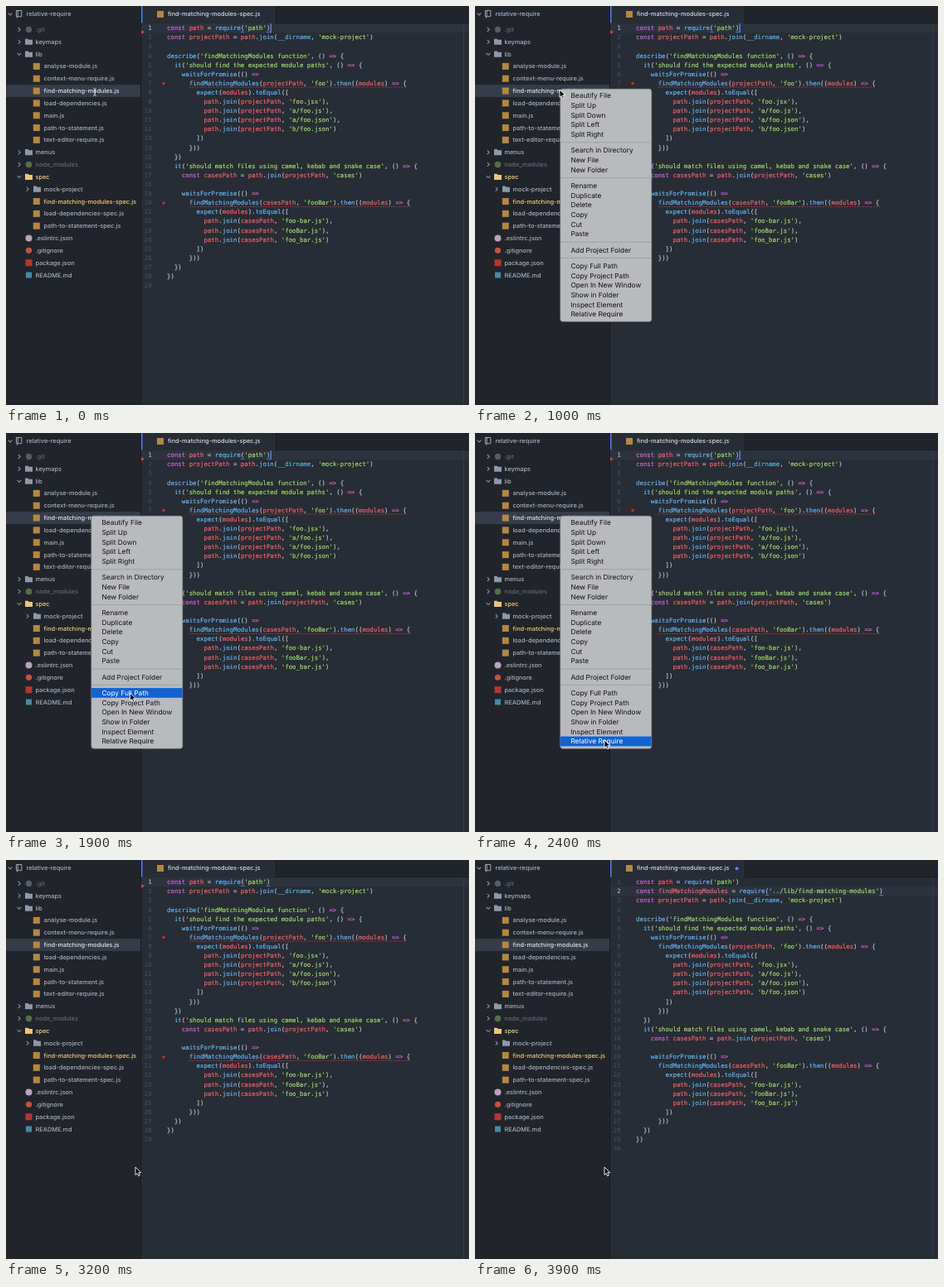
Recreate the animation shown at these times as an HTML page. Size 558 by 482 pixels, loop 4000 ms.

```html
<!DOCTYPE html>
<html lang="en">
<head>
<meta charset="utf-8">
<title>Relative require</title>
<style>
html, body { margin: 0; width: 100%; height: 100%; overflow: hidden; background: #21252b; }
svg { display: block; width: 558px; height: 482px; text-rendering: geometricPrecision; }
text { white-space: pre; fill: currentColor; }
.ui { font: 500 7.35px Inter, "Liberation Sans", sans-serif; }
.menu { font: 8.3px Inter, "Liberation Sans", sans-serif; }
.code { font: 7.39px "DejaVu Sans Mono", monospace; stroke: currentColor; stroke-width: .16; }
</style>
</head>
<body>
<svg id="stage" viewBox="0 0 558 482"></svg>
<script>
const CW = 4.449, LH = 11.107, TOP = 21.2, LEFT = 194;
const SOURCE = `const path = require('path')
const projectPath = path.join(__dirname, 'mock-project')

describe('findMatchingModules function', () => {
  it('should find the expected module paths', () => {
    waitsForPromise(() =>
      findMatchingModules(projectPath, 'foo').then((modules) => {
        expect(modules).toEqual([
          path.join(projectPath, 'foo.jsx'),
          path.join(projectPath, 'a/foo.js'),
          path.join(projectPath, 'a/foo.json'),
          path.join(projectPath, 'b/foo.json')
        ])
      }))
  })
  it('should match files using camel, kebab and snake case', () => {
    const casesPath = path.join(projectPath, 'cases')

    waitsForPromise(() =>
      findMatchingModules(casesPath, 'fooBar').then((modules) => {
        expect(modules).toEqual([
          path.join(casesPath, 'foo-bar.js'),
          path.join(casesPath, 'fooBar.js'),
          path.join(casesPath, 'foo_bar.js')
        ])
      }))
  })
})
`.split('\n');
const INSERTED = "const findMatchingModules = require('../lib/find-matching-modules')";

// depth, kind, label, state
const TREE = [
  [0, 'closed git', '.git', 'dim'], [0, 'closed folder', 'keymaps'], [0, 'open folder', 'lib'],
  [1, 'js', 'analyse-module.js'], [1, 'js', 'context-menu-require.js'],
  [1, 'js', 'find-matching-modules.js', 'selected'], [1, 'js', 'load-dependencies.js'],
  [1, 'js', 'main.js'], [1, 'js', 'path-to-statement.js'], [1, 'js', 'text-editor-require.js'],
  [0, 'closed folder', 'menus'], [0, 'closed node', 'node_modules', 'dim'],
  [0, 'open folder', 'spec', 'changed'], [1, 'closed folder', 'mock-project'],
  [1, 'js', 'find-matching-modules-spec.js', 'changed'], [1, 'js', 'load-dependencies-spec.js'],
  [1, 'js', 'path-to-statement-spec.js'], [0, 'lint', '.eslintrc.json'],
  [0, 'git', '.gitignore'], [0, 'pkg', 'package.json'], [0, 'doc', 'README.md']
];
const TINT = { dim: '#626a78', selected: '#e4e8ee', changed: '#f3cd80' };

const MENU = ['Beautify File', 'Split Up', 'Split Down', 'Split Left', 'Split Right', '',
  'Search in Directory', 'New File', 'New Folder', '',
  'Rename', 'Duplicate', 'Delete', 'Copy', 'Cut', 'Paste', '', 'Add Project Folder', '',
  'Copy Full Path', 'Copy Project Path', 'Open In New Window', 'Show in Folder',
  'Inspect Element', 'Relative Require'];

const rect = (x, y, w, h, fill, more = '') =>
  `<rect x="${x}" y="${y}" width="${w}" height="${h}" fill="${fill}" ${more}/>`;
const path = (d, fill, stroke = 'none', more = '') =>
  `<path d="${d}" fill="${fill}" stroke="${stroke}" ${more}/>`;
const dot = (x, y, r, fill) => `<circle cx="${x}" cy="${y}" r="${r}" fill="${fill}"/>`;
const text = (cls, x, y, s, color, more = '') =>
  `<text class="${cls}" x="${x}" y="${y}" color="${color}" ${more}>${s}</text>`;
const group = (id, body) => `<g id="${id}">${body}</g>`;

function chevron(x, y, open) {
  const d = open ? `M${x - 2.4} ${y - 1.2}l2.4 2.4l2.4-2.4` : `M${x - 1.2} ${y - 2.4}l2.4 2.4l-2.4 2.4`;
  return path(d, 'none', '#8a92a0', 'stroke-width="1.1"');
}

function icon(kind, x, y, tint) {
  switch (kind) {
    case 'folder':
      return path(`M${x - 4.5} ${y - 3.6}h3.6l1 1.2h4.4v6h-9z`, tint === 'changed' ? '#eec47c' : '#8e98a8');
    case 'js': return rect(x - 4, y - 4, 8, 8, '#b5873f');
    case 'git': return dot(x, y, 3.6, tint === 'dim' ? '#565e6b' : '#c9503f');
    case 'node': return dot(x, y, 3.8, '#557048');
    case 'lint': return dot(x, y, 4, '#b7a3bd');
    case 'pkg': return rect(x - 4, y - 4, 8, 8, '#b5362f');
    case 'doc': return rect(x - 3.5, y - 3.5, 7, 7, '#458ba3');
  }
}

function tree() {
  let s = rect(0, 0, 162, 482, '#21252b') + chevron(5, 9.8, true)
    + path('M12.4 5.5h6.4v7.2h-6.4zM14.2 5.5v7.2M13.6 12.7v2', 'none', '#9da5b4')
    + text('ui', 24.5, 12.4, 'relative-require', '#a8b0be');
  TREE.forEach(([depth, kinds, label, tint], i) => {
    const y = 28.4 + i * 14.83, x = 27.5 + depth * 10, kind = kinds.split(' ');
    if (tint === 'selected') s += rect(0, y - 7.4, 162, 14.8, '#363c48');
    if (kind[1]) s += chevron(x - 11.5, y, kind[0] === 'open');
    s += icon(kind.pop(), x - (label.endsWith('.js') ? .7 : 0), y, tint)
      + text('ui', x + 8, y + 2.6, label, TINT[tint] || '#a8b0be');
  });
  return s;
}

function paint(line) {
  const colors = ['#a0e070', '#d46ae4', '#56b6e6', '#64b8fa', '#f8626e'];
  return line.replace(/('[^']*')|(const\b|=>)|(__dirname)|(\w+(?=\())|(\w+)/g,
    (m, ...g) => `<tspan color="${colors[g.findIndex(Boolean)]}">${m}</tspan>`);
}

function editor(lines, active) {
  const rowY = i => TOP + i * LH, cur = lines[active];
  let s = rect(163, rowY(active), 395, LH, '#2c333d');
  lines.forEach((line, i) => {
    const y = rowY(i) + 8, indent = line.search(/\S|$/);
    s += text('code', 175.6, y, i + 1, i === active ? '#abb2bf' : '#454d5b', 'text-anchor="end"')
      + text('code', LEFT + indent * CW, y, paint(line.trim()), '#bdc4cf');
  });
  for (const col of [cur.indexOf('('), cur.length - 1])
    s += rect(LEFT + col * CW, rowY(active) + LH - 1.2, CW, .8, '#528bff');
  return s;
}

function lint() {
  let s = path('M163.2 29l3.6 2.5l-3.6 2.5z', '#e0484b');
  for (const i of [6, 19]) {
    const y = TOP + i * LH, end = LEFT + SOURCE[i].length * CW;
    s += dot(190, y + 5.7, 1.8, '#d3262b')
      + path(`M${LEFT + 6 * CW} ${y + 10.2}H${end}`, 'none', '#c23c44', 'stroke-width=".8" stroke-dasharray="1.8 1.4"');
  }
  return s;
}

const rows = [];
function menu() {
  let y = 108.3, s = rect(102.8, 100.2, 110, 281, '#b9babd', 'rx="3" stroke="#85878b" stroke-width=".6"')
    + rect(103, 0, 109.6, 11.7, '#1262d0', 'id="bar"');
  for (const label of MENU) {
    if (label) {
      s += text('menu', 115.4, y + 3, label, '#111', 'data-item');
      rows.push(y);
      y += 11.7;
    } else {
      s += rect(103, y - 2.4, 109.6, .9, '#9b9da1');
      y += 7.5;
    }
  }
  return s;
}

const $ = id => document.getElementById(id);
$('stage').innerHTML = rect(163, 0, 395, 482, '#282c34')
  + rect(163, 0, 395, 20.6, '#21252b') + rect(163, 0, 162, 21, '#282c34')
  + rect(325, 0, 1, 21, '#181a1f') + rect(326, 20.2, 232, 1, '#181a1f')
  + group('before', editor(SOURCE, 0) + lint())
  + group('after', editor([SOURCE[0], INSERTED, ...SOURCE.slice(1)], 1) + dot(315.6, 10.2, 2, '#568af2'))
  + rect(551, 21, .8, 461, '#3a3f49')
  + rect(0, 0, 1.3, LH, '#528bff', 'id="caret"')
  + tree() + rect(162, 0, 1, 482, '#181a1f') + rect(163, 0, 1.4, 20.5, '#568af2')
  + icon('js', 186, 10) + text('ui', 195, 12.4, 'find-matching-modules-spec.js', '#d7dae0')
  + group('menu', menu())
  + group('beam', path('M-1.8-4.5q1.8 0 1.8 1.4v6.2q0 1.4-1.8 1.4M1.8-4.5q-1.8 0-1.8 1.4v6.2q0 1.4 1.8 1.4',
      'none', '#e8e8e8', 'stroke-width=".7" transform="translate(107 104)"'))
  + group('arrow', path('M0 0v9.4l2.2-2l1.5 3.3l1.6-.7l-1.5-3.3h3z', '#000', '#fff', 'stroke-width=".9"'));

const items = [...document.querySelectorAll('[data-item]')];
const show = (id, on) => { $(id).style.display = on ? '' : 'none'; };

// step, x, y
const ROUTE = [[0, 102, 101], [10, 102, 101], [12, 118, 147], [14, 140, 214],
  [18, 148, 300], [23, 156, 371], [40, 156, 371]];
function pointer(n) {
  const i = ROUTE.findIndex(p => p[0] > n), [a, ax, ay] = ROUTE[i - 1], [b, bx, by] = ROUTE[i];
  const k = (n - a) / (b - a);
  return [ax + (bx - ax) * k, ay + (by - ay) * k];
}

function draw(now) {
  const n = Math.floor(now % 4000 / 100), done = n >= 34, [x, y] = pointer(n);
  show('before', !done);
  show('after', done);

  show('caret', n < 4 || n >= 8 && n < 31 || done && n < 38);
  $('caret').setAttribute('x', LEFT + (done ? INSERTED : SOURCE[0]).length * CW);
  $('caret').setAttribute('y', TOP + (done ? LH : 0));

  show('menu', n >= 10 && n < 31);
  $('menu').style.opacity = Math.min(1, 1 - .4 * (n - 28));
  const hit = n > 10 && n !== 27 ? rows.findIndex(r => Math.abs(y - r) <= 5.85) : -1;
  show('bar', hit >= 0);
  if (hit >= 0) $('bar').setAttribute('y', rows[hit] - 5.7);
  items.forEach((el, i) => el.setAttribute('color', i === hit ? '#fff' : '#111'));

  show('beam', n < 3);
  show('arrow', n >= 3);
  $('arrow').setAttribute('transform', `translate(${x} ${y})`);
}

const start = performance.now();
function tick() {
  draw(performance.now() - start);
  requestAnimationFrame(tick);
}
tick();
</script>
</body>
</html>
```
